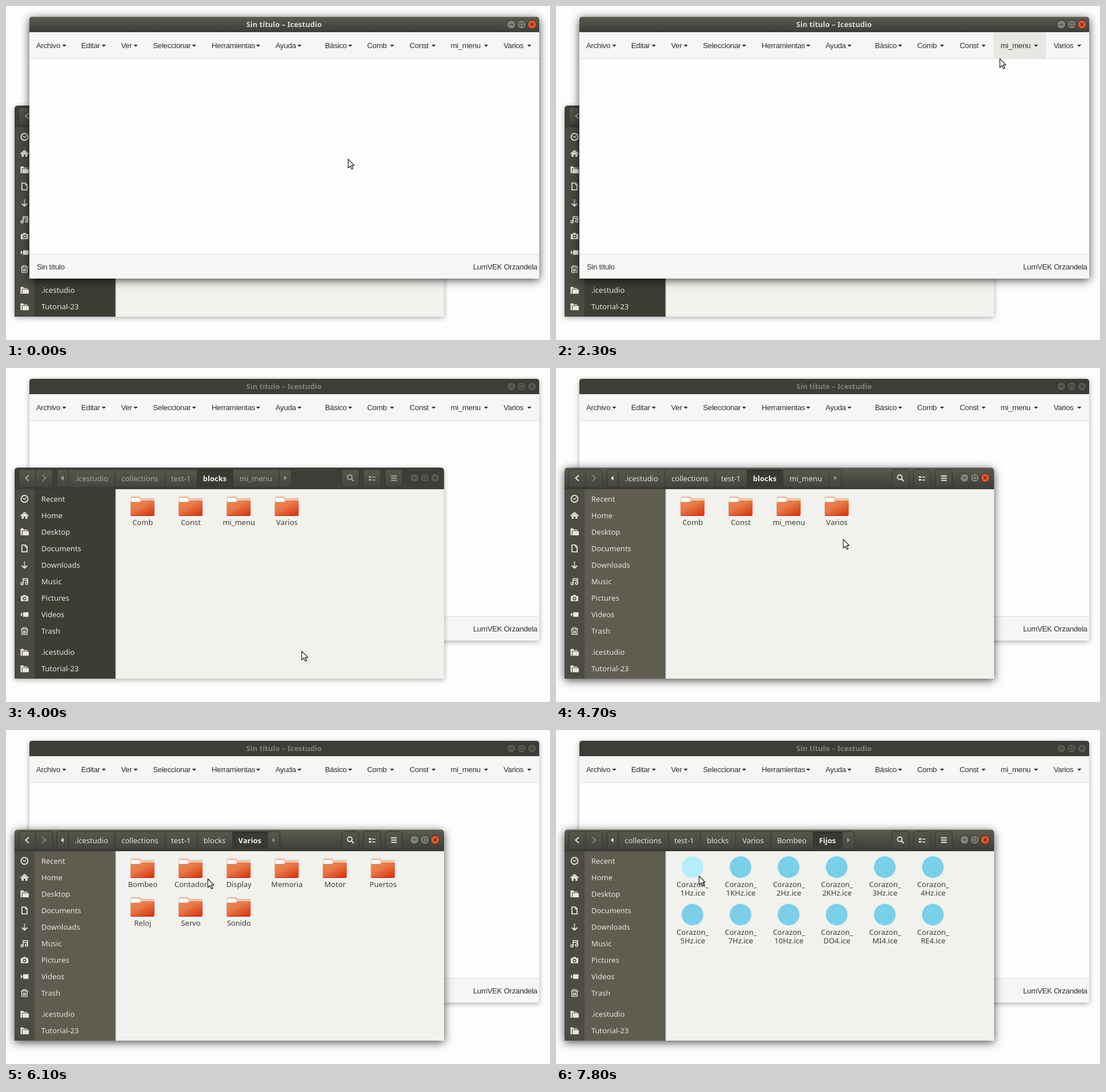
An HTML page that plays this animation: 955x587 px, repeating every 8 s.

```html
<!DOCTYPE html>
<html lang="es">
<head>
<meta charset="utf-8">
<title>Icestudio</title>
<style>
html, body { margin: 0; width: 100%; height: 100%; overflow: hidden; background: #fdfdfd; }
svg { display: block; }
text { font: 13px "Noto Sans", "Open Sans", sans-serif; white-space: pre; }
.b { font-weight: 700; }
.m { text-anchor: middle; }
.app { font: 13.3px "Liberation Sans", Arial, sans-serif; letter-spacing: -.3px; fill: #2d2f30; }
.deep { filter: drop-shadow(0 3px 8px rgba(0,0,0,.7)); }
.soft { filter: drop-shadow(0 2px 5px rgba(0,0,0,.32)); }
</style>
</head>
<body>
<svg id="stage" width="955" height="587" viewBox="0 0 955 587">
  <defs>
    <linearGradient id="bar" x2="0" y2="1"><stop stop-color="#5b5c50"/><stop offset="1" stop-color="#3d3c37"/></linearGradient>
    <linearGradient id="btn" x2="0" y2="1"><stop stop-color="#56574c"/><stop offset="1" stop-color="#454540"/></linearGradient>
    <linearGradient id="front" x2=".75" y2="1"><stop stop-color="#d98a52"/><stop offset=".45" stop-color="#e87b4c"/><stop offset="1" stop-color="#dc3a12"/></linearGradient>
    <g id="folder">
      <path d="M-20 15V-14q0-2 2-2H-4l2 3H19q2 0 2 2V15z" fill="#fbfaf7" stroke="#c9b7a8" stroke-width=".8"/>
      <path d="M-19-14.5H-5l2 3H20" fill="none" stroke="#e58a5f" stroke-width="1.2"/>
      <path d="M-21-5q0-2 2-2H-5l3-3H19q2 0 2 2V16q0 2-2 2H-19q-2 0-2-2z" fill="url(#front)"/>
      <path d="M-20.5-5.5q.5-1 2-1H-4.500l3-3H19q1.500 0 1.500 1.500" fill="none" stroke="#f5b590" stroke-width=".9"/>
      <path d="M-20 17.500H20" stroke="#b52b0b" stroke-width="1"/>
    </g>
  </defs>
  <g id="files"></g>
  <g id="editor"></g>
  <path id="cursor" d="M.7.7V16L4.400 12.700 7 18.300 9.300 17.300 6.800 11.600H11.400Z" fill="#fff" stroke="#1c1c1c" stroke-width="1.200" stroke-linejoin="round"/>
</svg>
<script>
const LOOP = 8000, STEP = 100;
const $ = id => document.getElementById(id);
const stage = $('stage'), files = $('files'), editor = $('editor'), cursor = $('cursor');

const rect = (x, y, w, h, fill, more = '') =>
  `<rect x="${x}" y="${y}" width="${w}" height="${h}" fill="${fill}" ${more}/>`;
const text = (x, y, s, fill, cls = '') =>
  `<text x="${x}" y="${y}" fill="${fill}" class="${cls}">${s}</text>`;
const path = (d, color, width = 0) => width
  ? `<path d="${d}" fill="none" stroke="${color}" stroke-width="${width}"/>`
  : `<path d="${d}" fill="${color}" fill-rule="evenodd"/>`;
const at = (x, y, body, more = '') => `<g transform="translate(${x} ${y})" ${more}>${body}</g>`;
const topRound = (x, y, w, h, r) =>
  `M${x} ${y + h}V${y + r}q0-${r} ${r}-${r}H${x + w - r}q${r} 0 ${r} ${r}V${y + h}z`;

// Minimise, maximise, close
function windowButtons(x, y, active) {
  const glyphs = ['M-3.500 0H3.500', 'M-3-3H3V3H-3Z', 'M-2.500-2.500 2.500 2.500M2.500-2.500-2.500 2.500'];
  return glyphs.map((d, i) => {
    const fill = !active ? '#5a5950' : i < 2 ? '#82817a' : '#e2572e';
    return at(x + i * 18.2, y,
      `<circle r="7.600" fill="${fill}" stroke="#2e2d29" stroke-width="1"/>` +
      path(d, i == 2 && active ? '#5e1d0b' : '#35342f', 1.1));
  }).join('');
}

const menus = [
  ['Archivo', 53, 98.5], ['Editar', 132, 168], ['Ver', 202, 224], ['Seleccionar', 258, 326.5],
  ['Herramientas', 361, 439], ['Ayuda', 473, 511.5], ['Básico', 560, 600.5], ['Comb', 634, 674],
  ['Const', 708.5, 747], ['mi_menu', 780.5, 839], ['Varios', 873.5, 915]
];

function drawEditor(active, hover) {
  const pale = '#f5f7f6', line = '#d9dddc';
  let s = `<path d="${topRound(41, 19, 895, 460, 5)}" fill="#fefefe" class="${active ? 'deep' : 'soft'}"/>`;
  s += path(topRound(41, 19, 895, 27, 5), active ? 'url(#bar)' : '#3e3d38');
  if (active) s += path('M46 19.500H931', '#6d6e62', 1);
  s += text(488, 37, 'Sin título – Icestudio', active ? '#dfdbd2' : '#858379', 'b m');
  s += windowButtons(887, 32.5, active);
  s += rect(41, 46, 895, 46, pale) + rect(41, 92, 895, 1, line);
  if (hover) s += rect(768, 46, 92, 46, '#e7e7e4');
  for (const [name, x, caret] of menus)
    s += text(x, 73.5, name, '', 'app') + path(`M${caret} 68h7.400l-3.700 3.700z`, '#2d2f30');
  s += rect(41, 436, 895, 43, pale) + rect(41, 436, 895, 1, line);
  s += text(54, 462.5, 'Sin título', '', 'app') + text(820, 462.5, 'LumVEK Orzandela', '', 'app');
  for (const [x, y] of [[97, 72], [508, 72], [104.5, 461], [922, 461]]) s += rect(x, y, 1, 1, '#999');
  return s;
}

// Sidebar symbols, centred on 0,0
const dir = c => path('M-7-6H-2L-1-4H5V-2.500H-4.500V6H-7Z', c) + path('M-3.500-1.500H7.500V6H-3.500Z', c);
const places = [
  ['Recent', c => `<circle r="6" fill="none" stroke="${c}" stroke-width="1.800"/>` + path('M-3-1.500 0 1 3-2', c, 1.4)],
  ['Home', c => path('M-7 1 0-5 7 1', c, 1.8) + path('M-5 1 0-3.300 5 1V6H1.500V2H-1.500V6H-5Z', c)],
  ['Desktop', dir],
  ['Documents', c => path('M-4.500-6H1.500L4.500-3V6H-4.500Z', c, 1.8) + path('M1-6V-2H5Z', c)],
  ['Downloads', c => path('M0-6V-4M0-3V-1M0 0V4M-4.800 1 0 5.500 4.800 1', c, 2)],
  ['Music', c => path('M-2.500 4V-5H5.500V2.500M-2.500-2H5.500', c, 1.6) +
    `<circle cx="-4.300" cy="3.800" r="2.100" fill="none" stroke="${c}" stroke-width="1.500"/><circle cx="3.700" cy="2.800" r="2.100" fill="none" stroke="${c}" stroke-width="1.500"/>`],
  ['Pictures', c => path('M-6.500-3.500H-3L-2-5.500H2L3-3.500H6.500V5.500H-6.500ZM0-2.500a3.300 3.300 0 1 0 .01 0Z', c) +
    `<circle cy=".8" r="1.700" fill="${c}"/>`],
  ['Videos', c => path('M-2.500-4H7V4H-2.500ZM-6.500-3.500-3 0-6.500 3.500Z', c)],
  ['Trash', c => path('M-6.500-3.500H6.500M-3-4V-6H3V-4M-5-3 -4.500 6H4.500L5-3M-2-1V4M0-1V4M2-1V4', c, 1.4)],
  ['.icestudio', dir],
  ['Tutorial-23', dir]
];
const placeY = i => 230 + i * 29.05 + (i > 8 ? 8.2 : 0);

const crumbWidth = {
  '.icestudio': 82, collections: 88, 'test-1': 56, blocks: 62,
  mi_menu: 81, Varios: 62, Bombeo: 74, Fijos: 51
};
const root = ['collections', 'test-1', 'blocks'];
const folders = [
  ['Comb', 'Const', 'mi_menu', 'Varios'],
  ['Bombeo', 'Contador', 'Display', 'Memoria', 'Motor', 'Puertos', 'Reloj', 'Servo', 'Sonido'],
  ['Fijos', 'Variables']
];
const notes = '1Hz 1KHz 2Hz 2KHz 3Hz 4Hz 5Hz 7Hz 10Hz DO4 MI4 RE4'.split(' ');
const sounds = notes.map(n => `Corazon_|${n}.ice`);

const trails = [
  { names: ['.icestudio', ...root, 'mi_menu'], on: 3 },
  { names: ['.icestudio', ...root, 'Varios'], on: 4 },
  { names: [...root, 'Varios', 'Bombeo'], on: 4 },
  { names: [...root, 'Varios', 'Bombeo', 'Fijos'], on: 5 }
];
const note = (name, n) => `“${name}” selected\u00a0 (containing ${n} items)`;

// What the file list shows from each moment on
const views = [
  { t: 0, trail: 0, items: folders[0] },
  { t: 5200, trail: 0, items: folders[0], pick: 3 },
  { t: 5400, trail: 1, items: [], status: note('Varios', 9) },
  { t: 5500, trail: 1, items: folders[1] },
  { t: 6500, trail: 1, items: folders[1], pick: 0 },
  { t: 6700, trail: 2, items: [], status: note('Bombeo', 2) },
  { t: 6800, trail: 2, items: [] },
  { t: 6900, trail: 2, items: folders[2] },
  { t: 7500, trail: 2, items: folders[2], pick: 0 },
  { t: 7700, trail: 3, items: [] },
  { t: 7800, trail: 3, items: sounds }
];

const cell = (i, tall) => [240 + (i % 6) * 84.4, 242 + Math.floor(i / 6) * (tall ? 83.5 : 68)];

function drawItem(name, i, hover, picked) {
  const lines = name.split('|'), isFile = lines.length > 1;
  const [x, y] = cell(i, isFile);
  let s = isFile
    ? `<circle cx="${x - .5}" cy="${y - 1}" r="19" fill="${hover ? '#b4eef8' : '#7bcfe9'}"/>`
    : at(x - .5, y, '<use href="#folder"/>',
      picked ? 'style="filter:sepia(.4) saturate(2) brightness(.9)"' : hover ? 'style="filter:brightness(1.2)"' : '');
  if (picked) {
    const w = name.length * 7.6 + 14;
    s += rect(x - w / 2, 262, w, 20, '#f07746', 'rx="3"');
  }
  lines.forEach((l, k) => s += text(x, y + 34 + k * 15.2, l, picked ? '#fff' : '#3c3c3c', 'm'));
  return s;
}

function drawTrail({ names, on }, ink) {
  let x = 109, s = '', split = '';
  names.forEach((name, i) => {
    const w = crumbWidth[name] + (name == 'blocks' && i == on ? 1 : 0);
    if (i == on) s += rect(x, 179, w, 30, '#3a3934') + rect(x, 179, w, 2, '#2f2e2a');
    s += text(x + w / 2, 198.5, name, i == on ? '#f1efe8' : ink, i == on ? 'b m' : 'm');
    x += w;
    split += `M${x + .5} 179V209`;
  });
  return rect(89.5, 178.5, x - 67.5, 31, 'url(#btn)', 'rx="4" stroke="#35342f"') + s +
    path('M109.500 179V209' + split, '#35342f', 1) +
    path('M101 189.500V197.500L96 193.500Z', ink) + path(`M${x + 9} 189.500V197.500L${x + 14} 193.500Z`, '#96948b');
}

function drawFiles(view, active, hover) {
  const ink = active ? '#e6e4dc' : '#a9a79f', label = '#e8e6df';
  const box = (x, w) => rect(x + .5, 178.5, w, 31, 'url(#btn)', 'rx="4" stroke="#35342f"');
  let s = `<path d="${topRound(15, 175, 754, 371, 6)}" fill="#f1f1ee" class="${active ? 'deep' : 'soft'}"/>`;
  s += path(topRound(15, 175, 754, 38, 6), active ? 'url(#bar)' : '#3e3d38');
  if (active) s += path('M21 175.500H763', '#6d6e62', 1);
  s += rect(15, 212, 754, 1, '#34332e');
  s += box(22, 59) + path('M52 179V209', '#35342f', 1);
  s += path('M40 188.500 34.500 193.500 40 198.500', ink, 2) + path('M64 188.500 69.500 193.500 64 198.500', '#85837a', 2);
  s += drawTrail(trails[view.trail], ink);
  s += box(589, 30) + box(627, 30) + box(665, 30);
  s += `<circle cx="603.500" cy="192" r="4" fill="none" stroke="${ink}" stroke-width="1.900"/>` + path('M606.500 195 610.500 199', ink, 2.2);
  s += path('M637 190h4v3h-4zm0 5h4v3h-4zm5.500-4h6v1.500h-6zm0 5h6v1.500h-6z', ink);
  s += path('M676 189.500h10M676 193.500h10M676 197.500h10', ink, 1.8);
  s += windowButtons(717, 193, active);

  s += rect(15, 213, 35, 333, active ? '#4d4c43' : '#4c4b43');
  s += rect(50, 213, 142, 333, active ? '#5e5d50' : '#3d3c35') + rect(192, 213, 1.5, 333, '#c6c6bf');
  places.forEach(([name, icon], i) => {
    const y = placeY(i);
    s += at(32.5, y, icon(label)) + text(62, y + 4.5, name, label);
  });

  view.items.forEach((name, i) => s += drawItem(name, i, i == hover, i === view.pick));
  if (view.status)
    s += path('M508.500 546V521q0-2.500 2.500-2.500H769V546Z', '#fcfcfb') +
      path('M508.500 546V521q0-2.500 2.500-2.500H769', '#cfcfc8', 1) +
      text(636.5, 537, view.status, '#4a4a4a', 'm');
  return s;
}

// Pointer: end time, x, y, number of steps taken to get there
const moves = [
  [0, 600, 268.5, 1], [600, 669, 182, 1], [1200, 811, 68, 5], [2300, 778.5, 92, 1],
  [3100, 545, 322, 8], [3200, 528, 406, 1], [3500, 524, 465, 2], [3800, 518.5, 497, 2],
  [4500, 534, 440, 2], [4700, 503.5, 300.5, 2], [5000, 503, 262, 3], [6300, 254, 260, 5],
  [7300, 250.5, 256, 2]
];
const within = (t, a, b) => t >= a && t < b;

function pointer(t) {
  let [, x, y] = moves[0];
  for (const [end, toX, toY, n] of moves) {
    const begin = end - (n - 1) * STEP;
    if (t < begin) break;
    const f = Math.min(n, Math.floor((t - begin) / STEP) + 1) / n;
    x += (toX - x) * f;
    y += (toY - y) * f;
  }
  return [x, y];
}

let lastKey = '';
function render(t) {
  const [x, y] = pointer(t);
  const hidden = within(t, 5400, 5500) || within(t, 6700, 6900) || within(t, 7700, 7800);
  cursor.setAttribute('transform', `translate(${x} ${y})`);
  cursor.style.display = hidden ? 'none' : '';

  const v = views.findLastIndex(w => t >= w.t), view = views[v];
  const raised = t >= 4000, focused = t >= 4100, menu = within(t, 1500, 3200);
  const hover = raised ? view.items.findIndex((name, i) => {
    const [cx, cy] = cell(i, name.includes('|'));
    return Math.abs(x - cx) < 26 && y > cy - 18 && y < cy + 38;
  }) : -1;
  const key = [v, raised, focused, menu, hover].join();
  if (key == lastKey) return;
  lastKey = key;
  files.innerHTML = drawFiles(view, focused, hover);
  editor.innerHTML = drawEditor(!raised, menu);
  stage.insertBefore(raised ? files : editor, cursor);
}

const start = performance.now();
function tick() {
  render((performance.now() - start) % LOOP);
  requestAnimationFrame(tick);
}
tick();
</script>
</body>
</html>
```
